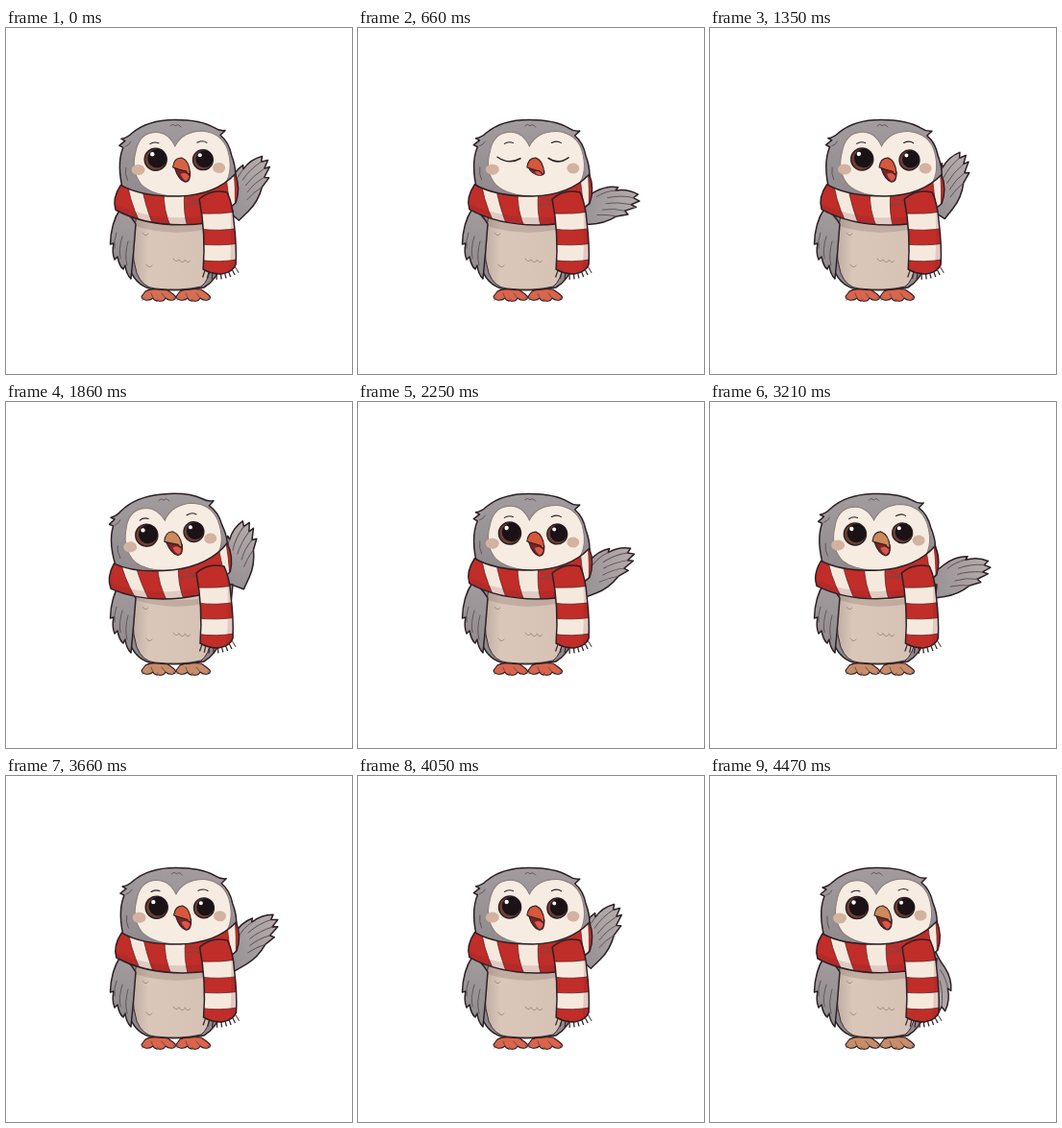
Recreate the animation shown at these times as an HTML page. Size 360 px wide and 360 px high, loop 4500 ms.

```html
<!DOCTYPE html>
<html lang="en">
<head>
<meta charset="utf-8">
<title>Waving owl</title>
<style>
  html, body { margin: 0; height: 100%; overflow: hidden; background: #fff; }
  svg { display: block; width: 100vw; height: 100vh; }
  .ink { stroke: #2c2025; stroke-width: 1.5; stroke-linejoin: round; stroke-linecap: round; }
  .thin { stroke-width: 1.1; }
  .fine { fill: none; stroke: #5e5053; stroke-width: .9; stroke-linecap: round; }
  .down { fill: none; stroke: #a58e83; stroke-linecap: round; }
  .red { fill: #c12d28; stroke: #6a2224; stroke-width: .8; }
  .cream { fill: #f5e9de; }
  .beak { fill: var(--beak); }
  .feet { fill: var(--feet); }
</style>
</head>
<body>
<svg viewBox="0 0 360 360">
  <defs>
    <linearGradient id="grey" x2="0" y2="1">
      <stop stop-color="#a39c9e"/><stop offset="1" stop-color="#8f898d"/>
    </linearGradient>
    <linearGradient id="wingGrey">
      <stop stop-color="#969094"/><stop offset="1" stop-color="#b5acac"/>
    </linearGradient>
    <linearGradient id="bellyTone">
      <stop stop-color="#c1aea3"/><stop offset=".2" stop-color="#dac7ba"/><stop offset="1" stop-color="#d6c2b5"/>
    </linearGradient>
    <path id="band" d="M117 164Q138 176 178 175Q216 173 236 151Q242 166 237 181Q226 192 205 203Q150 210 112 190Q108 178 117 164Z"/>
    <path id="tail" d="M200 178Q212 167 229 171Q235 184 236 202Q239 226 238 246Q235 254 223 256Q212 256 204 251Q207 214 200 178Z"/>
    <clipPath id="inBand"><use href="#band"/></clipPath>
    <clipPath id="inTail"><use href="#tail"/></clipPath>
    <path id="tuft" class="down" d="M0 0q3 5 6 1"/>
    <g id="foot">
      <path class="ink thin feet" d="M3 2Q10-2 25 0L32 5Q37 9 32 11Q27 12 24 9Q22 13 17 12Q12 12 11 9Q8 12 3 11Q-3 9 0 6Z"/>
      <path class="fine" d="M9 4L11 9M20 4L24 9M1 9L0 11M16 10L15 12M32 9L34 10"/>
    </g>
  </defs>

  <g id="wing">
    <path class="ink" fill="url(#wingGrey)" d="M-4-4Q8-7 17-12Q30-18 42-15L39-12Q52-13 62-6L57-3L63 1L54 4L59 7L47 10L50 14L38 15Q24 22 10 21L-4 20Z"/>
    <path class="fine" d="M30-5Q44-7 57-3M28 1Q40 0 54 4M24 7Q36 6 47 10M18 12Q28 12 38 15M19-7Q28-12 39-12"/>
  </g>

  <use href="#foot" x="142" y="272"/>
  <use href="#foot" x="178" y="272"/>
  <path class="ink" fill="#8f888c" d="M122 190Q118 262 149 271Q178 275 206 270Q231 256 236 190Z"/>
  <path class="ink" style="stroke-width:.9" fill="url(#bellyTone)" d="M136 195Q128 230 136 255Q142 270 155 271Q182 274 203 269Q219 258 216 195Z"/>
  <path d="M136 198Q170 210 206 204V210Q170 217 134 206Z" fill="#7c625c" opacity=".25"/>
  <use href="#tuft" x="142" y="213"/><use href="#tuft" x="146" y="246"/>
  <use href="#tuft" x="174" y="240"/><use href="#tuft" x="180" y="241"/><use href="#tuft" x="186" y="241"/>
  <path class="ink" fill="url(#grey)" d="M119 188Q109 203 108.500 225L112 224Q110 234 113 241L116 238Q118 248 122 251L124 247Q125 256 130 261Q133 232 135 204Q129 193 119 188Z"/>
  <path class="fine" d="M115 213Q112 222 113 229M121 217Q117 230 119 240M127 222Q123 236 126 247"/>

  <g id="head">
    <path class="ink" fill="url(#grey)" d="M120 172Q112 143 119 125L115 123L121 118L117 116Q123 115 128 110Q144 96 172 95.500Q199 95 213 103Q219 107 225 106L220 111Q229 118 232 132Q240 152 233 168Q205 182 170 180Q137 179 120 172Z"/>
    <path class="fine" d="M168 102q3-3 5 0q3-3 6 1M121 124q4-1 6-5M220 114q-4-1-7-3M122 146q-1 7 2 13"/>
    <path fill="#f6ece2" stroke="#8a7b78" d="M173 123Q165 107 150 109Q135 111 132 130Q127 150 139 164Q153 176 181 175Q213 174 226 161Q234 147 228 127Q222 109 202 107Q181 107 173 123Z"/>
    <g fill="#d3b29f"><ellipse cx="135" cy="148" rx="7" ry="5.500"/><ellipse cx="219" cy="145" rx="6.500" ry="5.500"/></g>
    <path class="ink thin" fill="none" d="M147 121Q151 118 156 120M196 119Q202 116 206 119"/>
    <g id="eyes">
      <g id="eye">
        <circle class="ink" cx="153" cy="137" r="11.500" fill="#6f4034"/>
        <circle cx="154.500" cy="136" r="9.800" fill="#1b1216"/>
        <circle cx="149.500" cy="131.500" r="2.200" fill="#fff"/>
      </g>
      <use href="#eye" transform="translate(63 12.2) scale(.91)"/>
    </g>
    <path id="lids" class="ink" fill="none" d="M140 135Q152 143 164 136M193 135Q203 142 214 134"/>
    <g id="mouth">
      <path class="ink thin" fill="#7b2424" d="M173 146L189 149Q190 160 184 160Q177 158 173 146Z"/>
      <path fill="#d9564b" d="M179 152Q185 149 188 154Q187 159 184 159Q181 157 179 152Z"/>
    </g>
    <path class="ink thin beak" d="M171 145Q172 135 180 135Q188 138 189 151Q187 153 185 149Q177 147 171 145Z"/>

    <use href="#band" class="cream"/>
    <g clip-path="url(#inBand)">
      <path class="red" d="M105 155H123Q125 178 138 204H105ZM139 165Q142 184 153 210L171 210Q161 190 162 168Z"/>
      <path class="red" d="M184 168Q181 190 188 210H208L232 190Q228 168 226 150ZM234 145H245V190H236Q237 165 234 145Z"/>
      <path d="M108 182Q150 203 206 195V212H106Z" fill="#6c2029" opacity=".15"/>
    </g>
    <use href="#band" class="ink" fill="none"/>
    <path class="fine" d="M184 184Q194 181 203 184M186 176Q194 178 200 182"/>
  </g>

  <g id="scarfEnd">
    <path fill="none" stroke="#3b2a2d" stroke-width="13" stroke-dasharray="1.200 3" d="M205 253Q222 259 238 249"/>
    <use href="#tail" class="cream"/>
    <g clip-path="url(#inTail)">
      <path class="red" d="M196 164H240V191Q222 194 200 193ZM200 209Q222 212 242 208V224Q223 227 200 225ZM198 241Q222 245 244 240V262H198Z"/>
      <path d="M231 168Q235 208 231 260H242V170Z" fill="#6c2029" opacity=".15"/>
    </g>
    <use href="#tail" class="ink" fill="none"/>
  </g>
</svg>
<script>
const LOOP = 4500;
const [wing, head, eyes, lids, mouth, scarfEnd] =
  ['wing', 'head', 'eyes', 'lids', 'mouth', 'scarfEnd'].map(id => document.getElementById(id));

const clamp = x => Math.min(1, Math.max(0, x));
const smooth = x => (x = clamp(x)) * x * (3 - 2 * x);
// Soft pulses of the given width around each moment
const pulses = (t, width, ...moments) =>
  moments.reduce((sum, m) => sum + Math.exp(-(((t - m) / width) ** 2)), 0);
const mix = (from, to, k) => `rgb(${from.map((v, i) => Math.round(v + (to[i] - v) * k))})`;
const move = (el, value) => el.setAttribute('transform', value);
const squash = (y, k) => `translate(0 ${y}) scale(1 ${k}) translate(0 ${-y})`;

// The head leans right, dips left three times and passes the middle twice
const sway = t => 4.5 - 9 * pulses(t, 220, 260, 1810, 3360) - 4.5 * pulses(t, 250, 2700, 4470);

// A slightly slowing wave that ends with the wing lowered
function wingAngle(t) {
  const s = t / 1000 - 1.87;
  const wave = -36 - 27 * Math.cos(2 * Math.PI * (1.93 * s - .07 * s * s)) + 1.6 * sway(t);
  const rest = smooth((t - 4180) / 260);
  return wave + (82 - wave) * rest;
}

function draw(t) {
  const lean = sway(t), open = clamp(1 - 1.4 * pulses(t, 110, 680)), warmth = clamp(lean / 3);
  move(wing, `translate(230 184) rotate(${wingAngle(t)})`);
  move(head, `translate(${lean}) rotate(${lean * (lean < 0 ? 1 : .3)} 175 175)`);
  move(scarfEnd, `translate(${lean * .5})`);
  move(eyes, squash(138, open));
  move(mouth, squash(147, .5 + .5 * open));
  eyes.style.display = open > .2 ? '' : 'none';
  lids.style.display = open > .2 ? 'none' : '';
  const style = document.documentElement.style;
  style.setProperty('--beak', mix([205, 138, 90], [216, 86, 58], warmth));
  style.setProperty('--feet', mix([200, 140, 104], [218, 100, 76], warmth));
}

const start = performance.now();
function tick() {
  draw((performance.now() - start) % LOOP);
  requestAnimationFrame(tick);
}
tick();
</script>
</body>
</html>
```
